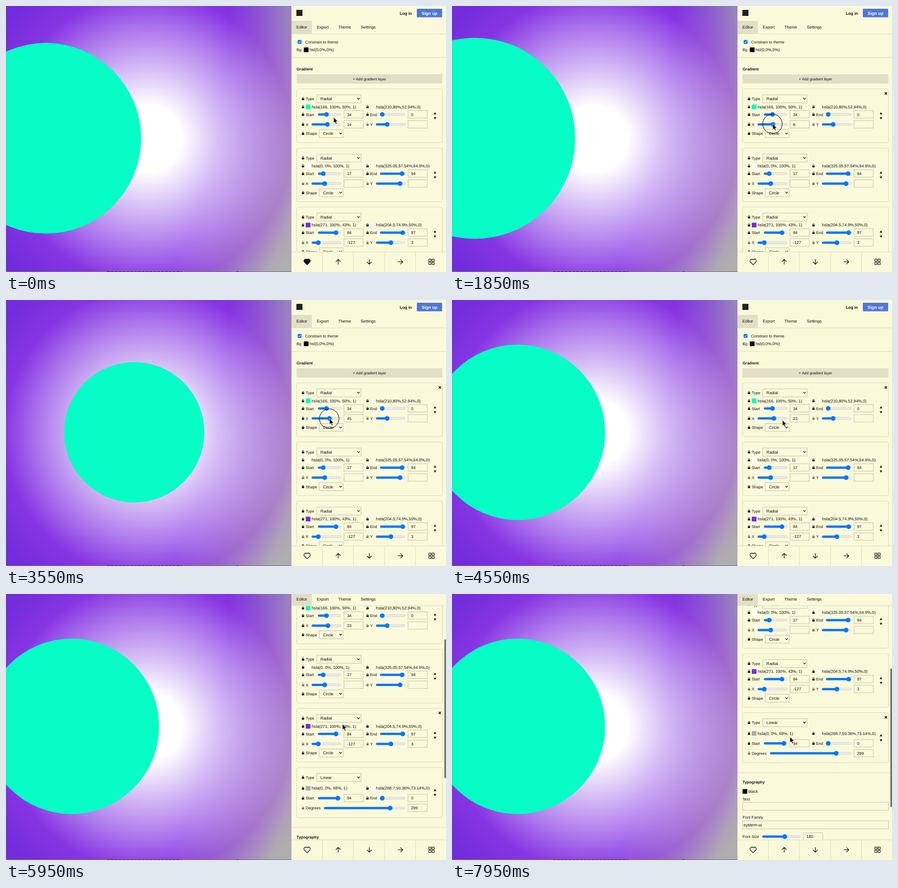
An HTML page for the animation above (8 s loop, 800 by 483 pixels).

```html
<!DOCTYPE html>
<html lang="en">
<head>
<meta charset="utf-8">
<title>Gradient editor</title>
<style>
  html, body { margin: 0; width: 100%; height: 100%; overflow: hidden; background: #faf9da; }
  #art {
    position: absolute; left: 0; top: 0; width: 519px; height: 482px;
    background:
      radial-gradient(circle at 50% 50%, #fff 17%, rgba(247,238,254,.75) 36%, rgba(226,190,251,.55) 55%,
        rgba(185,75,243,.3) 74%, rgba(185,75,243,0) 94%),
      radial-gradient(circle at -127% 3%, rgb(114,44,220) 84%, rgba(114,44,220,0) 97%),
      #aeaeae;
  }
  svg { position: absolute; left: 0; top: 0; display: block; }
  text {
    font-family: "Liberation Sans", Arial, sans-serif; font-size: 7.4px; fill: #111;
    text-rendering: geometricPrecision; white-space: pre;
  }
  .label { font-size: 7.15px; }
  .bold { font-weight: 700; }
  .box { fill: none; stroke: #c9c8ae; stroke-width: 1; }
  .line { stroke: #e3e2c8; stroke-width: 1; }
  .icon { fill: none; stroke: #111; stroke-width: 1.1; stroke-linecap: round; stroke-linejoin: round; }
</style>
</head>
<body>
<div id="art"></div>
<svg id="stage" width="800" height="483" viewBox="0 0 800 483"></svg>
<script>
const LOOP = 8000, PAPER = '#faf9da', SHADE = '#e1e0c6', BLUE = '#0075ff', HOVER = '#5550c4', TEAL = '#06fec6';
const ART_W = 518, ART_H = 481;

const rect = (x, y, w, h, fill, extra = '') =>
  `<rect x="${x}" y="${y}" width="${w}" height="${h}" fill="${fill}" ${extra}/>`;
const box = (x, y, w, h = 14.5) =>
  `<rect class="box" x="${x}" y="${y}" width="${w}" height="${h}"/>`;
const path = (d, extra = 'class="icon"') => `<path d="${d}" ${extra}/>`;
const line = (x1, y1, x2, y2) => path(`M${x1} ${y1}L${x2} ${y2}`, 'class="line"');
// y is the vertical middle of the text
const text = (x, y, s, cls = '', extra = '') =>
  `<text x="${x}" y="${y + 2.6}" class="${cls}" ${extra}>${s}</text>`;
const label = (x, y, s) => text(x, y, s, 'label');

const lock = (x, y, color = '#111') =>
  rect(x - 2.1, y - 0.7, 4.2, 3.2, color, 'rx=".5"') +
  path(`M${x - 1.2} ${y - 0.6}v-.8a1.2 1.2 0 0 1 2.4 0v.8`, `fill="none" stroke="${color}" stroke-width=".8"`);

const slider = (x1, x2, y, thumb, id = '') =>
  rect(x1 + 0.3, y - 1.8, x2 - x1 - 0.6, 3.6, '#ecebec', 'rx="1.8" stroke="#c4c3bd" stroke-width=".6"') +
  rect(x1, y - 2, thumb - x1, 4, BLUE, `rx="2" ${id && `id="${id}Fill"`}`) +
  `<circle cx="${thumb}" cy="${y}" r="4.2" fill="${BLUE}" ${id && `id="${id}Thumb"`}/>`;

const field = (x, y, value, id = '') =>
  box(x, y - 7, 35, 13.5) + text(x + 5.5, y, value, '', id && `id="${id}"`);

const select = (x, y, w, value) =>
  box(x, y - 7.2, w) + text(x + 6.8, y, value) +
  path(`M${x + w - 6.6} ${y - 1.2}l2 2.2l2 -2.2`);

const swatch = (x, y, color, extra = '') => rect(x, y - 4.3, 8.6, 8.6, color, `rx="1" ${extra}`);

const arrows = y =>
  path(`M777.7 ${y + 2}h4.6l-2.3 -4z M777.7 ${y + 7.3}h4.6l-2.3 4z`, 'fill="#111"');

const cards = [
  { y: 150.5, h: 97.5, from: [TEAL, 'hsla(166, 100%, 50%, 1)'], to: 'hsla(210,80%,52.94%,0)',
    start: 34, end: 0, x: 14, xAt: 584.3, y2: '', yAt: 693 },
  { y: 258, h: 97.5, from: ['#fff', 'hsla(0, 0%, 100%, 1)'], to: 'hsla(325.05,57.54%,64.9%,0)',
    start: 17, end: 94, x: '', xAt: 579.5, y2: '', yAt: 716.5 },
  { y: 365.2, h: 97.5, from: ['#722cdb', 'hsla(271, 100%, 43%, 1)'], to: 'hsla(204.5,74.9%,50%,0)',
    start: 84, end: 97, x: -127, xAt: 567.8, y2: 3, yAt: 699.8 },
  { y: 472.6, h: 91, linear: true, from: ['#adadad', 'hsla(0, 0%, 69%, 1)'], to: 'hsla(268.7,50.36%,73.14%,0)',
    start: 94, end: 0 }
];

function cardMarkup(c, i) {
  const row = c.linear ? { color: 37.7, start: 55.6, arrow: 41 } : { color: 32.6, start: 46.4, arrow: 44.3 };
  const grey = '#77766a';
  const yc = c.y + row.color, ys = c.y + row.start, yx = c.y + 64.5, yl = c.y + 81;
  let s = `<rect x="528.5" y="${c.y}" width="265" height="${c.h}" rx="3" fill="none" stroke="#dcdbc0"/>` +
    path(`M786.7 ${c.y + 6.2}l4.2 4.2m0 -4.2l-4.2 4.2`, `id="close${i}" stroke="#111" stroke-width="1.4"`) +
    lock(540, c.y + 18) + label(545, c.y + 18, 'Type') +
    select(565, c.y + 18, 80.5, c.linear ? 'Linear' : 'Radial') +
    lock(540, yc) + swatch(545, yc, c.from[0]) + text(555.7, yc, c.from[1]) +
    lock(657.3, yc) + swatch(662, yc, '#fcfbe6', 'stroke="#efeed4" stroke-width=".6"') + text(672.8, yc, c.to) +
    lock(540, ys) + label(545, ys, 'Start') +
    slider(567, 609.5, ys, 571 + 0.345 * c.start, 'start' + i) + field(614.5, ys, c.start) +
    lock(657.3, ys) + label(662, ys, 'End') +
    slider(680, 726.3, ys, 684 + 0.385 * c.end) + field(731, ys, c.end) +
    arrows(c.y + row.arrow);
  if (c.linear) {
    const yd = c.y + 73.6;
    return s + lock(540, yd, grey) + label(545, yd, 'Degrees') +
      slider(578, 726.3, yd, 698.5) + field(731, yd, 299);
  }
  return s + lock(540, yx, i ? grey : '#111') + label(545, yx, 'X') +
    slider(555.5, 609.5, yx, c.xAt, 'x' + i) + field(614.5, yx, c.x, 'xValue' + i) +
    lock(657.3, yx, grey) + label(662, yx, 'Y') +
    slider(672.5, 726.3, yx, c.yAt) + field(731, yx, c.y2) +
    lock(540, yl) + label(545, yl, 'Shape') + select(569.5, yl, 43.5, 'Circle');
}

const content =
  rect(530.3, 61.8, 7, 7, BLUE, 'rx="1.2"') +
  path('M531.9 65.4l1.4 1.5l2.5 -3.3', 'fill="none" stroke="#fff" stroke-width="1"') +
  label(543.8, 65.3, 'Constrain to theme') +
  label(528.3, 79.3, 'Bg') + swatch(541.5, 79.5, '#000') + text(552, 79.3, 'hsl(0,0%,0%)') +
  line(519, 93.5, 800, 93.5) +
  text(528.3, 114, 'Gradient', 'label bold') +
  rect(528.3, 124, 265, 17, SHADE) +
  text(661, 132.4, '+ Add gradient layer', '', 'text-anchor="middle" style="font-size:6.8px"') +
  cards.map(cardMarkup).join('') +
  line(519, 581.5, 800, 581.5) +
  text(528.3, 598.5, 'Typography', 'label bold') +
  swatch(528.3, 615.5, '#000') + text(539, 615.5, 'black') +
  label(528.3, 629.6, 'Text') + box(528.5, 635, 265) +
  label(528.3, 662, 'Font Family') + box(528.5, 669, 265) +
  text(530, 676.4, 'system-ui', '', 'style="font-size:7.8px"') +
  label(528.3, 697.5, 'Font Size') + slider(564, 634.5, 697.5, 605) + field(639, 697.5, 180);

const header =
  rect(519, 0, 281, 51, PAPER) +
  rect(528, 7, 11, 11, '#222') +
  text(727, 13, 'Log in', 'bold', 'text-anchor="middle"') +
  rect(747, 5, 46, 15.5, '#4f77d6', 'rx="1"') +
  text(770, 13, 'Sign up', 'bold', 'text-anchor="middle" style="fill:#fff;font-size:7.8px"') +
  rect(519, 27, 37, 24, SHADE) + line(556, 50.7, 800, 50.7) +
  [['Editor', 528], ['Export', 565], ['Theme', 604], ['Settings', 645]]
    .map(([s, x]) => text(x, 38.6, s, '', 'style="font-size:7.5px"')).join('');

const arrowIcon = (x, turn) =>
  `<g transform="translate(${x} 464.5) rotate(${turn})">${path('M0 4.3V-4.3M-3.9 -.5L0 -4.4L3.9 -.5')}</g>`;
const footer =
  rect(519, 446, 281, 37, PAPER) + line(519, 446.5, 800, 446.5) +
  [575.5, 631.5, 688.5, 744.5].map(x => line(x, 446, x, 483)).join('') +
  path('M547.5 469.9l-4.9 -4.9a3.1 3.1 0 0 1 4.9 -4.3a3.1 3.1 0 0 1 4.9 4.3z', 'class="icon" id="heart"') +
  arrowIcon(604, 0) + arrowIcon(660.5, 180) + arrowIcon(717, 90) +
  [[768.8, 459.6], [774.6, 459.6], [768.8, 465.4], [774.6, 465.4]]
    .map(([x, y]) => rect(x, y, 3.9, 3.9, 'none', 'stroke="#111"')).join('');

document.getElementById('stage').innerHTML =
  `<clipPath id="artClip"><rect width="519" height="482"/></clipPath>
   <circle id="disc" cy="240.2" fill="${TEAL}" clip-path="url(#artClip)"/>` +
  rect(0, 482, 519, 1, '#77747c') +
  path('M184 482.5H320M419 482.5h4', 'stroke="#333" stroke-dasharray="5 2"') +
  rect(519, 0, 281, 483, PAPER) +
  `<g id="content">${content}</g><g id="header">${header}</g>${footer}` +
  rect(797, 0, 3, 252, '#74736a', 'id="bar" rx="1.5"') +
  `<circle id="ring" r="17.7" fill="none" stroke="#111"/>` +
  path('M0 0V10.6L2.4 8.4L4.2 12.3L6 11.5L4.3 7.7H7.6Z',
    'id="cursor" fill="#000" stroke="#fff" stroke-width=".7" stroke-linejoin="round"');

const $ = id => document.getElementById(id);
const set = (id, attrs) => { for (const k in attrs) $(id).setAttribute(k, attrs[k]); };
const show = (id, on) => set(id, { visibility: on ? 'visible' : 'hidden' });

const smooth = u => u * u * (3 - 2 * u);
const linear = u => u;

// keys: [time, value, value...]; returns the values at time t
function track(keys, t, ease = smooth) {
  if (t <= keys[0][0]) return keys[0].slice(1);
  for (let i = 1; i < keys.length; i++) {
    const a = keys[i - 1], b = keys[i];
    if (t <= b[0]) {
      const u = ease((t - a[0]) / (b[0] - a[0]));
      return a.slice(1).map((v, k) => v + (b[k + 1] - v) * u);
    }
  }
  return keys[keys.length - 1].slice(1);
}

const xKeys = [[950, 14], [1850, 8], [3550, 45], [4250, 23]];
const scrollKeys = [[4650, 0], [4800, 8], [5100, 58.5], [5500, 125], [5800, 153], [6000, 159],
  [7150, 159], [7350, 175], [7700, 235], [7950, 257]];
const pointKeys = [[0, 595.7, 202], [800, 584, 213.7], [1850, 583.2, 214], [3550, 588.2, 215.4],
  [4250, 586, 215.4], [4550, 600.8, 218], [5100, 615.5, 230], [5900, 612, 236],
  [6900, 588, 253.6], [7950, 614.5, 259.3]];

function draw(t) {
  const x = Math.round(track(xKeys, t)[0]);
  const [scroll] = track(scrollKeys, t, linear);
  const [px, py] = track(pointKeys, t);

  const cx = ART_W * x / 100;
  set('disc', { cx, r: 0.342 * Math.hypot(Math.max(cx, ART_W - cx), ART_H / 2) });

  const thumb = 582.6 + 0.12 * x;
  set('x0Thumb', { cx: thumb });
  set('x0Fill', { width: thumb - 555.5 });
  $('xValue0').textContent = x;

  set('content', { transform: `translate(0 ${-scroll})` });
  set('header', { transform: `translate(0 ${-Math.min(scroll, 29.5)})` });
  cards.forEach((c, i) => {
    const dy = py + scroll - c.y;
    show('close' + i, t >= 300 && dy > 0 && dy < c.h);
    const over = px > 567 && px < 610 && Math.abs(dy - (c.linear ? 55.6 : 46.4)) < 4;
    set(`start${i}Fill`, { fill: over ? HOVER : BLUE });
  });

  $('heart').style.fill = t < 300 ? '#111' : 'none';
  show('bar', (t > 4650 && t < 6500) || t > 7150);
  set('bar', { y: scroll * 0.529 - 1 });
  show('ring', t >= 900 && t < 4300);
  set('ring', { cx: px - 0.5, cy: py });
  set('cursor', { transform: `translate(${px} ${py})` });
}

const began = performance.now();
function tick() {
  draw((performance.now() - began) % LOOP);
  requestAnimationFrame(tick);
}
tick();
</script>
</body>
</html>
```
